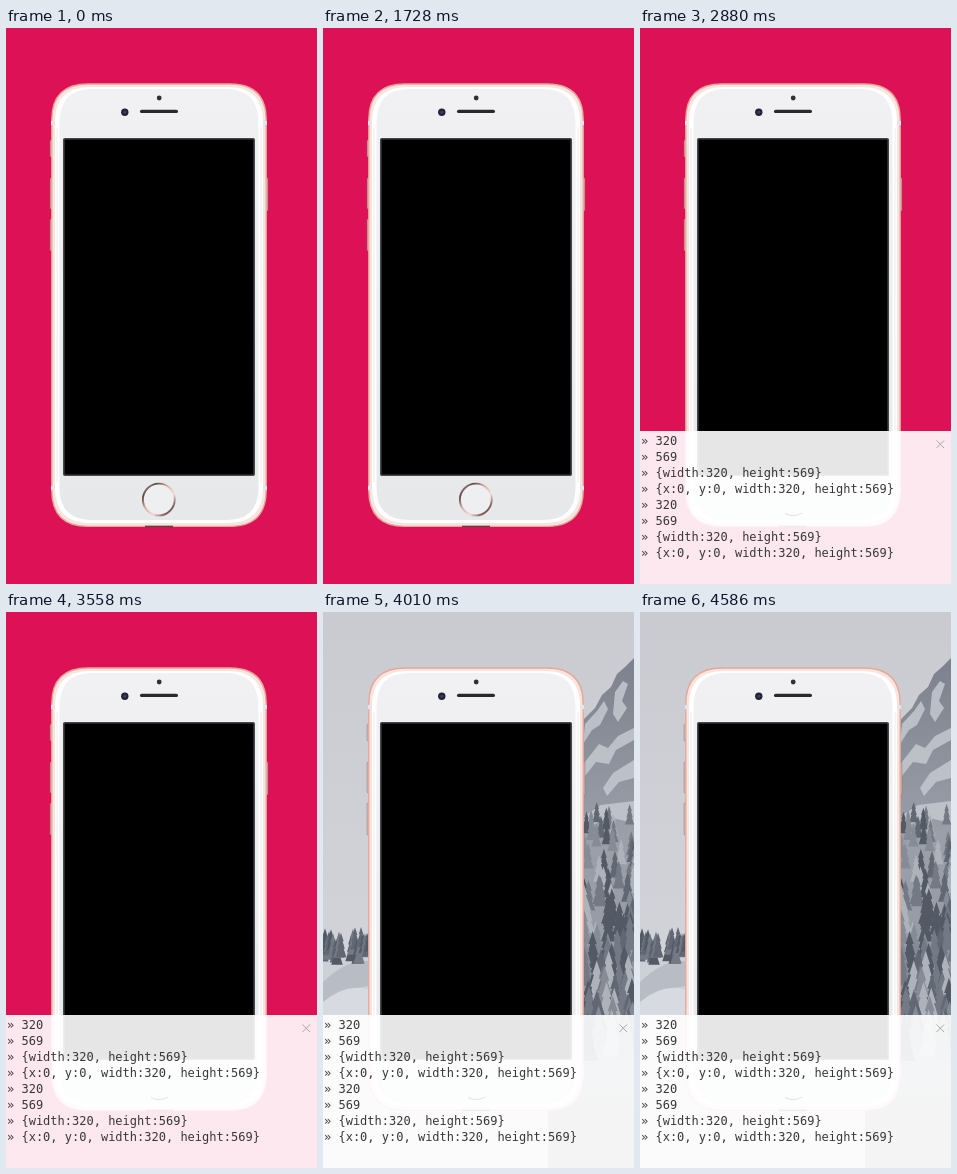
Animation of 311 by 556 pixels, one loop 4.97 s. Source, as an HTML page:

```html
<!DOCTYPE html>
<html lang="en">
<head>
<meta charset="utf-8">
<title>Phone with console</title>
<style>
  html, body { margin: 0; width: 100%; height: 100%; overflow: hidden; background: #dd1155; }
  svg { display: block; width: 100vw; height: 100vh; }
  #console text { font: 12px "DejaVu Sans Mono", monospace; fill: #383838; white-space: pre; }
</style>
</head>
<body>
<svg viewBox="0 0 311 556" preserveAspectRatio="none">
  <defs>
    <linearGradient id="sky" x2="0" y2="1">
      <stop stop-color="#cacbd1"/><stop offset=".6" stop-color="#d1d3d8"/><stop offset="1" stop-color="#d5d7dc"/>
    </linearGradient>
    <linearGradient id="rock" x2="0" y2="1">
      <stop stop-color="#7d818d"/><stop offset=".35" stop-color="#9b9fa9"/><stop offset="1" stop-color="#8d929b"/>
    </linearGradient>
    <linearGradient id="face" x2="0" y2="1">
      <stop stop-color="#f1f1f3"/><stop offset="1" stop-color="#e6e8e9"/>
    </linearGradient>
    <linearGradient id="ring" x2="1" y2="1">
      <stop stop-color="#e8cdc6"/><stop offset=".2" stop-color="#5f4541"/><stop offset=".42" stop-color="#d9b0a7"/>
      <stop offset=".65" stop-color="#f3ddd8"/><stop offset=".85" stop-color="#76544f"/><stop offset="1" stop-color="#e2c1ba"/>
    </linearGradient>
    <filter id="soft"><feGaussianBlur stdDeviation=".6"/></filter>
  </defs>

  <rect width="311" height="556" fill="#dd1155"/>

  <g id="scenery">
    <rect width="311" height="556" fill="url(#sky)"/>
    <g filter="url(#soft)">
      <path d="M225 150L262 106 272 96 279 83 288 75 294 62 302 55 311 46V556H225Z" fill="url(#rock)"/>
      <path d="M262 112l12-13 7-10 4 8-8 16-8 5-9 14ZM292 80l8-11 5 3-6 17 5 7-9 14-5-8ZM262 150l14-18 9 4 10-12 16-8v12l-18 10-7 14-13-2-11 14ZM280 176l10-15 21-13v18l-15 4-12 14ZM260 205l18-12 33-4v22l-22-5-29 10Z" fill="#c5c8cf" opacity=".85"/>
      <path d="M0 345L22 342 46 334V556H0Z" fill="#cdd1d7"/>
      <path d="M0 370Q25 346 46 349V374Q22 376 0 392Z" fill="#b8bdc5"/>
      <path d="M0 390Q24 370 46 378V556H0Z" fill="#d7dae0"/>
      <g id="trees"></g>
    </g>
  </g>

  <g id="phone">
    <g fill="#eed9d4" stroke="#8d6964" stroke-width=".6">
      <rect x="44.2" y="112" width="3" height="17" rx="1"/>
      <rect x="44.2" y="150" width="3" height="31" rx="1"/>
      <rect x="44.2" y="191" width="3" height="32" rx="1"/>
      <rect x="258.8" y="150" width="3" height="33" rx="1"/>
    </g>
    <path id="shell" d="M45.8 92Q45.8 56 82 56H224Q260.2 56 260.2 92V462Q260.2 498.4 224 498.4H82Q45.8 498.4 45.8 462Z" fill="#f6e4df" stroke="#e6a79a" stroke-width="1.4"/>
    <path d="M45 95h4M257 95h4M45 460h4M257 460h4" stroke="#e5e5ee" stroke-width="4"/>
    <path d="M49 94Q49 59 84 59H222Q257 59 257 94V460Q257 495 222 495H84Q49 495 49 460Z" fill="#fff"/>
    <path d="M53.5 95Q53.5 61 86 61H220Q252.5 61 252.5 95V460Q252.5 492 220 492H86Q53.5 492 53.5 460Z" fill="url(#face)"/>
    <path d="M51 100V455M255 100V455" stroke="#ececef"/>
    <rect x="57.8" y="110.8" width="190.4" height="336.4" rx="1" stroke="#45474b" stroke-width="1.6"/>
    <circle cx="153.2" cy="70" r="2.4" fill="#303035"/>
    <circle cx="118.8" cy="84.2" r="3.7" fill="#222233"/>
    <circle cx="118.8" cy="84.2" r="1.6" fill="#393d5e"/>
    <rect x="134" y="81.8" width="38" height="3.2" rx="1.6" fill="#29292d"/>
    <path d="M139 498.4h28" stroke="#60423e" stroke-width="1.4"/>
    <circle id="home" cx="152.8" cy="471.5" r="15.9" fill="#eeeff0" stroke="url(#ring)" stroke-width="1.9"/>
  </g>

  <g id="console">
    <rect y="403" width="311" height="153" fill="#fff" opacity=".9"/>
    <path d="M145 485.5Q153 490 162 485" fill="none" stroke="#e4e1e1"/>
    <path d="M296.5 412.5l7.5 7.5M304 412.5l-7.5 7.5" stroke="#aaa"/>
  </g>
</svg>
<script>
  const LOOP = 4970, CONSOLE_AT = 2880, SCENERY_AT = 4010;
  const byId = id => document.getElementById(id);

  function add(parent, tag, attributes, text = "") {
    const node = document.createElementNS("http://www.w3.org/2000/svg", tag);
    for (const name in attributes) node.setAttribute(name, attributes[name]);
    node.textContent = text;
    parent.append(node);
  }

  let seed = 11;
  const random = () => (seed = seed * 16807 % 2147483647) / 2147483647;

  function tree(x, top, height, color) {
    const w = height * .22, h = height;
    add(byId("trees"), "path", {
      d: `M${x} ${top}l${w * .5} ${h * .35}h${-w * .2}l${w * .4} ${h * .3}h${-w * .2}l${w * .5} ${h * .35}` +
         `h${-w * 2}l${w * .5} ${-h * .35}h${-w * .2}l${w * .4} ${-h * .3}h${-w * .2}Z`,
      fill: color
    });
  }

  // Forest on the right, denser and darker towards the front
  const greens = ["#626873", "#535a65", "#747a85", "#868c96", "#aeb3bb"];
  for (let i = 0; i < 110; i++) {
    const depth = i / 110;
    tree(255 + random() * 60, 188 + depth * 215, 20 + depth * 28, greens[Math.floor(random() * 5)]);
  }
  // Small groups of trees on the left slope
  for (let i = 0; i < 20; i++) {
    const x = i < 10 ? i * 2 : 28 + (i - 10) * 2;
    tree(x, 315 + random() * 12, 20 + random() * 7, greens[i % 3]);
  }

  const lines = ["320", "569", "{width:320, height:569}", "{x:0, y:0, width:320, height:569}"];
  [...lines, ...lines].forEach((line, i) =>
    add(byId("console"), "text", { x: 1, y: 417 + i * 16 }, "» " + line));

  const show = (id, visible) => byId(id).style.display = visible ? "" : "none";

  function draw() {
    const time = performance.now() % LOOP;
    const consoleOpen = time >= CONSOLE_AT;
    show("console", consoleOpen);
    show("home", !consoleOpen);
    show("scenery", time >= SCENERY_AT);
    requestAnimationFrame(draw);
  }
  draw();
</script>
</body>
</html>
```
